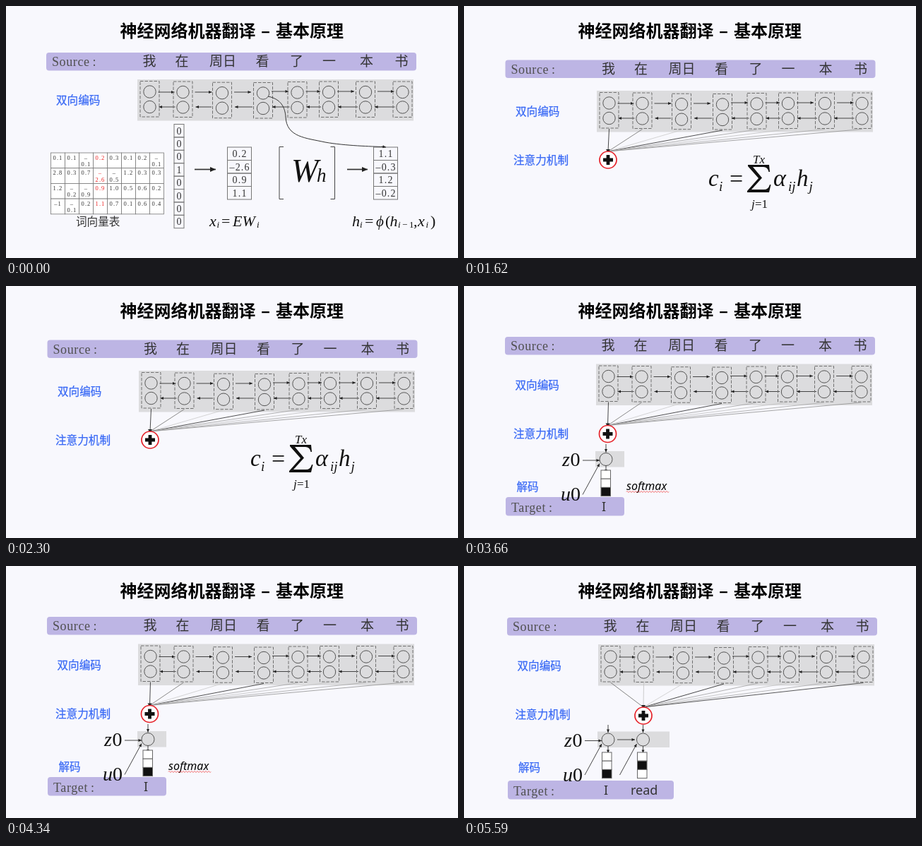
Animation of 640 by 357 pixels, one loop 6.12 s. Source, as an HTML page:

```html
<!DOCTYPE html>
<html lang="zh">
<head>
<meta charset="utf-8">
<style>
html, body { margin: 0; width: 100%; height: 100%; overflow: hidden; background: #f8f8fd; }
svg { display: block; width: 100%; height: 100%; }
text { font-family: "Noto Sans CJK SC", "Noto Sans CJK", sans-serif; fill: #333; white-space: pre; }
.title { font-weight: 700; font-size: 24px; fill: #000; }
.word { font-size: 19px; }
.label { font-size: 15.6px; fill: #3a6af5; stroke: #3a6af5; stroke-width: .25px; }
.caption { font-size: 15.6px; }
.side { font: 18px "Liberation Serif", serif; letter-spacing: .6px; fill: #505050; }
.num { font: 14px "Liberation Serif", serif; text-anchor: middle; letter-spacing: 1.2px; }
.cell { font: 8.5px "Liberation Serif", serif; text-anchor: middle; letter-spacing: 1.1px; }
.red { fill: #e22; }
.math { font-family: "Liberation Serif", "DejaVu Sans", serif; fill: #111; }
.it { font-style: italic; }
.out { font: 18px "Noto Sans", sans-serif; }
.soft { font: italic 16px "Noto Sans", sans-serif; fill: #000; }
</style>
</head>
<body>
<svg viewBox="0 0 640 357" preserveAspectRatio="none" id="stage"></svg>
<script>
const text = (x, y, cls, s, size) =>
  `<text x="${x}" y="${y}" class="${cls}"${size ? ` style="font-size:${size}px"` : ''}>${s}</text>`;
const rect = (x, y, w, h, fill = 'none', stroke = 'none', extra = '') =>
  `<rect x="${x}" y="${y}" width="${w}" height="${h}" fill="${fill}" stroke="${stroke}" ${extra}/>`;
const path = (d, color = '#333', width = 1) =>
  `<path d="${d}" fill="none" stroke="${color}" stroke-width="${width}"/>`;
const circle = (x, y, r, color = '#555', width = 1, fill = 'none') =>
  `<circle cx="${x}" cy="${y}" r="${r}" fill="${fill}" stroke="${color}" stroke-width="${width}"/>`;
const shift = (x, y, s) => `<g transform="translate(${x} ${y})">${s}</g>`;

function arrow(x1, y1, x2, y2, width = .9, head = 4.5) {
  const angle = Math.atan2(y2 - y1, x2 - x1) * 180 / Math.PI;
  return path(`M${x1} ${y1}L${x2} ${y2}`, '#333', width) +
    `<path d="M0 0L${-head} ${-head * .45}V${head * .45}Z" fill="#222" transform="translate(${x2} ${y2}) rotate(${angle})"/>`;
}

// Each part is [x, baseline, size, string]; letters are italic, the rest upright.
const math = parts => parts.map(([x, y, size, s]) =>
  text(x, y, /^[a-zA-Zαϕθ]/.test(s) ? 'math it' : 'math', s, size)).join('');

// Encoder columns: centre x and top of the dashed box.
const columns = [[203.5, 106.5], [250.5, 107], [306, 108.2], [364, 108.5],
                 [412.5, 107.5], [457, 107], [509, 107], [561.5, 107]];

function encoder() {
  let s = rect(186, 104, 391, 58.5, '#dcdcde');
  columns.forEach(([x, y], i) => {
    s += rect(x - 13.5, y, 27, 50.5, 'none', '#707070', 'stroke-dasharray="4.5 2"') +
      circle(x, y + 15, 8.7) + circle(x, y + 36.5, 8.7);
    if (i === 7) return;
    const next = columns[i + 1][0], topY = i < 3 ? 122 : 121;
    const start = x + (i === 1 || i === 2 || i === 6 ? 17 : 12);
    s += arrow(start, topY, Math.min(next - 12, start + 24), topY) +
      arrow(next - (i === 1 || i === 2 ? 15 : 11), 143, x + (i === 1 || i === 2 ? 18 : 13), 143);
  });
  return s;
}

const sideLabel = (y, name) => text(8, y, 'side', `${name}<tspan dx="4">:</tspan>`);

function sourceBar(x, y) {
  const words = [['我', 136.5], ['在', 182.5], ['周日', 231], ['看', 296.5],
                 ['了', 345], ['一', 391], ['本', 444], ['书', 493.5]];
  return shift(x, y, rect(0, 0, 524, 25.5, '#bdb5e4', 'none', 'rx="4"') +
    sideLabel(19, 'Source') + words.map(([w, wx]) => text(wx, 19.3, 'word', w)).join(''));
}

function stack(x, y, cells, rowHeight, width) {
  return cells.map((c, i) => rect(x, y + i * rowHeight, width, rowHeight, 'none', '#777') +
    text(x + width / 2 + .6, y + i * rowHeight + rowHeight * .77, 'num', c)).join('');
}

function softmaxStack(x, y, chosen) {
  return [0, 1, 2].map(i =>
    rect(x, y + i * 12.2, 13.5, 12.2, i === chosen ? '#111' : '#fff', '#666')).join('');
}

// Links from every encoder column into the sum node; tones holds one gray level per link.
function attention(x, y, dx, dy, tones) {
  const lines = columns.map(([cx, top], i) => {
    const g = tones[i];
    return path(`M${cx + dx} ${top + 51.5 + dy}L${x} ${y - 12}`, `rgb(${g},${g},${g})`, .85);
  }).join('');
  return lines + `<path d="M${x} ${y - 10}l-3 -5h6z" fill="#222"/>` +
    circle(x, y, 12, '#e5222a', 1.7, '#fff') + path(`M${x - 7} ${y}h14M${x} ${y - 7}v14`, '#111', 4.8);
}

// Summation sign with its limits; x, y is the lower left corner of the sign.
function sum(x, y) {
  return shift(x, y, '<path d="M0 0V-2L16 -20L1 -37V-39H31L32 -29H30.500Q29 -36 23 -36H8L21 -20.500L6 -4H24Q30 -4 32 -11H33.500L31 0Z" fill="#111"/>') +
    math([[x + 8, y - 41, 17, 'Tx'], [x + 6, y + 22, 17, 'j'], [x + 11, y + 22, 17, '=1']]);
}

function decoder(x, y, inY, steps) {
  let s = rect(x - 15, y - 11.5, steps === 2 ? 102 : 41, 22.5, '#dcdcde');
  for (let i = 0; i < steps; i++) {
    const cx = x + i * 49.5;
    s += circle(cx, y, 9) + arrow(cx, inY, cx, y - 10) + arrow(cx, y + 9, cx, y + 19) +
      arrow(cx - 33, y + 50, cx - 9, y + 6);
  }
  if (steps === 2) s += arrow(x + 13, y, x + 38, y);
  return s + arrow(x - 33, y + 1.5, x - 9, y + 1.5) +
    math([[x - 62, y + 9.5, 28, 'z'], [x - 50.5, y + 9.5, 28, '0'],
          [x - 64, y + 58.5, 28, 'u'], [x - 50, y + 58.5, 28, '0']]);
}

function targetBar(x, y, width, outputs) {
  return shift(x, y, rect(0, 0, width, 26.5, '#bdb5e4', 'none', 'rx="4"') +
    sideLabel(21, 'Target') + outputs.map(([w, wx]) => text(wx, 19.5, 'out', w)).join(''));
}

function embeddingTable() {
  const rows = ['0.1 0.1 –0.1 0.2 0.3 0.1 0.2 –0.1', '2.8 0.3 0.7 –2.6 –0.5 1.2 0.3 0.3',
                '1.2 –0.2 –0.9 0.9 1.0 0.5 0.6 0.2', '–1 –0.1 0.2 1.1 0.7 0.1 0.6 0.4'];
  return rows.map((row, r) => row.split(' ').map((value, c) => {
    const x = 63.5 + c * 20, y = 208 + r * 21.7, cls = c === 3 ? 'cell red' : 'cell';
    const lines = value.length > 3 ? ['–', value.slice(1)] : [value];
    return rect(x, y, 20, 21.7, '#fff', '#777', 'stroke-width=".8"') +
      lines.map((line, i) => text(x + 10, y + 9.5 + i * 9.5, cls, line)).join('');
  }).join('')).join('');
}

const heading = text(161.5, 43.5, 'title', '神经网络机器翻译') + text(361, 43.5, 'title', '–') +
  text(382, 43.5, 'title', '基本原理');

const embedding = sourceBar(57, 66) + encoder() + text(71, 139, 'label', '双向编码') +
  embeddingTable() + text(99, 311, 'caption', '词向量表') +
  stack(238, 167.5, [0, 0, 0, 1, 0, 0, 0, 0], 18.4, 14) + arrow(267, 231.5, 297, 231.5, 1.7, 8) +
  stack(313.5, 200, ['0.2', '–2.6', '0.9', '1.1'], 18.5, 34) +
  path('M393 199.5H387V273.5H393M459.5 199.5H465.5V273.5H459.5', '#444') +
  math([[404, 249, 46, 'W'], [440, 249, 27, 'h']]) + arrow(483, 231.5, 512, 231.5, 1.7, 8) +
  stack(520.5, 200, ['1.1', '–0.3', '1.2', '–0.2'], 18.5, 34) +
  path('M371 128C390 132 395 144 396 157C397 186 425 187 452 193C480 198 518 199 534 199.500') +
  arrow(532, 199, 538, 200) +
  math([[288, 312, 22, 'x'], [298.5, 314, 13, 'i'], [305, 312, 22, '='], [321, 312, 22, 'EW'], [355, 314, 13, 'i'],
        [490, 312, 22, 'h'], [501, 314, 13, 'i'], [508, 312, 22, '='], [524, 312, 21, 'ϕ'], [537, 312, 22, '('],
        [543.5, 312, 22, 'h'], [555, 314, 13, 'i'], [561, 314, 13, '−'], [571, 314, 13, '1'], [577, 312, 22, ','],
        [583, 312, 22, 'x'], [594.5, 314, 13, 'i'], [601, 312, 22, ')']]);

const plainSum = sourceBar(62, 78) + shift(5, 13, encoder()) +
  text(76, 152.5, 'label', '双向编码') + text(74, 221, 'label', '向量表示') +
  attention(207, 216, 5, 13, Array(8).fill(60)) + sum(420, 262) +
  math([[366, 253, 32, 'c'], [381, 260, 19, 'i'], [394, 254, 34, '='], [457, 254, 33, 'h'], [475, 260, 19, 'j']]);

const firstTones = [40, 120, 205, 50, 165, 195, 170, 150];
const nextTones = [110, 195, 205, 40, 165, 195, 170, 60];

const weightedSum = sourceBar(58.5, 76.5) + shift(2, 16, encoder()) +
  text(73, 155, 'label', '双向编码') + text(70, 224, 'label', '注意力机制') +
  attention(204, 218, 2, 16, firstTones) + sum(401, 264) +
  math([[346, 255, 33, 'c'], [361, 262, 19, 'i'], [376, 256, 34, '='], [438, 255, 34, 'α'],
        [459, 262, 19, 'ij'], [471, 255, 33, 'h'], [488.5, 262, 19, 'j']]);

const decodeState = sourceBar(58.5, 73) + shift(2, 9, encoder()) +
  text(73.5, 148, 'label', '双向编码') + text(70.5, 217, 'label', '注意力机制') + text(75, 291.5, 'label', '解码') +
  attention(204, 212, 2, 9, firstTones) + decoder(202, 247.5, 226, 1) +
  math([[250.5, 256, 28, 'z'], [261.5, 262, 16, 'i'], [272, 256, 28, '='], [292, 256, 25, 'ϕ'],
        [307, 262, 16, 'θ'], [315, 262, 16, "'"], [320, 256, 28, '('], [329, 256, 28, 'c'], [341, 262, 16, 'i'],
        [346.5, 256, 28, ','], [354.5, 256, 28, 'u'], [368, 262, 16, 'i'], [372, 262, 16, '−1'],
        [388, 256, 28, ','], [396, 256, 28, 'z'], [410, 262, 16, 'i'], [414, 262, 16, '−1'], [430, 256, 28, ')']]);

const firstWord = sourceBar(58, 72) + shift(1, 6.5, encoder()) +
  text(72.5, 146, 'label', '双向编码') + text(70, 215, 'label', '注意力机制') + text(74.5, 290, 'label', '解码') +
  attention(203.5, 209.5, 1, 6.5, firstTones) + targetBar(59, 299, 168, [['I', 136]]) +
  decoder(201, 245.5, 224, 1) + softmaxStack(194, 261, 2) + text(230, 289, 'soft', 'softmax') +
  path('M230 291.5' + 'q1 -2 2 0t2 0'.repeat(15), '#e33', .8);

const secondWord = sourceBar(61, 73) + shift(4, 7, encoder()) +
  text(75.5, 147, 'label', '双向编码') + text(72.5, 216, 'label', '注意力机制') + text(77, 291, 'label', '解码') +
  attention(254, 212, 4, 7, nextTones) + targetBar(62, 304, 235, [['I', 136], ['read', 174]]) +
  decoder(204, 246, 225, 2) + softmaxStack(195.5, 264, 2) + softmaxStack(245.5, 264, 1);

const scenes = [[embedding, 900], [plainSum, 720], [weightedSum, 1140],
                [decodeState, 900], [firstWord, 1140], [secondWord, 1320]];
const loop = scenes.reduce((total, [, ms]) => total + ms, 0);
const stage = document.getElementById('stage');
stage.innerHTML = heading + scenes.map(([s]) => `<g class="scene">${s}</g>`).join('');
const groups = stage.querySelectorAll('.scene');

function draw(now) {
  let t = now % loop, index = 0;
  while (t >= scenes[index][1]) t -= scenes[index++][1];
  groups.forEach((g, i) => g.style.display = i === index ? '' : 'none');
}
const start = performance.now();
function tick() {
  draw(performance.now() - start);
  requestAnimationFrame(tick);
}
tick();
</script>
</body>
</html>
```
